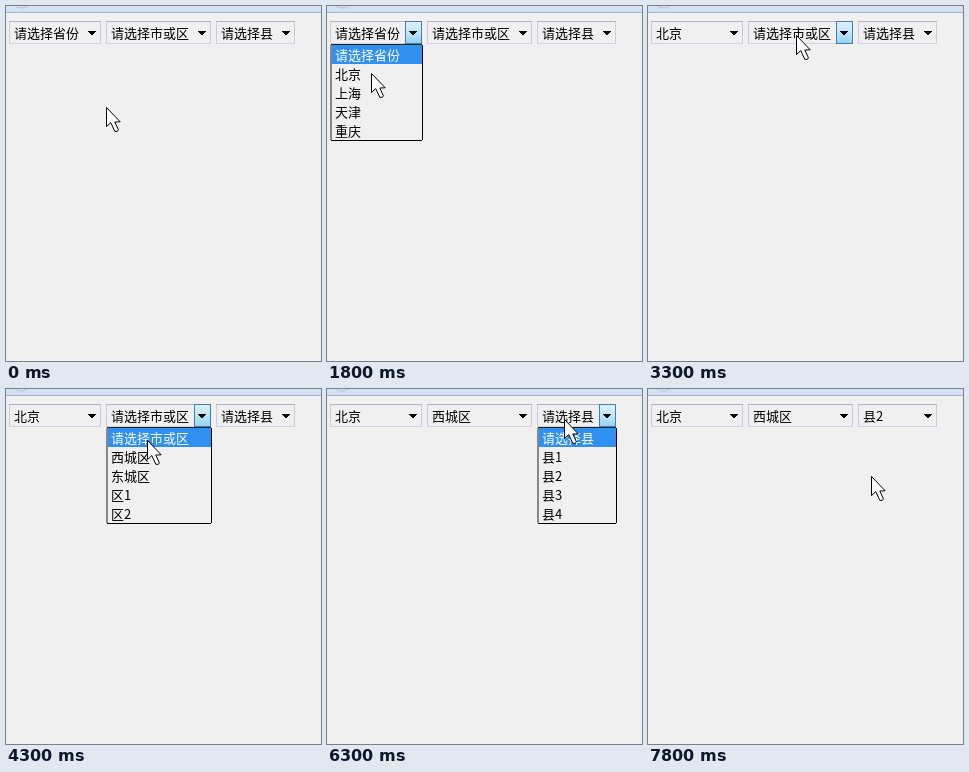
An HTML page with a canvas that plays this animation: 315 px wide and 355 px high, repeating every 8000 ms.

```html
<!DOCTYPE html>
<html lang="zh-CN">
<head>
<meta charset="utf-8">
<title>三级联动菜单</title>
<style>
html, body { margin: 0; width: 100%; height: 100%; overflow: hidden; background: #f0f0f0; }
canvas { display: block; }
</style>
</head>
<body>
<canvas id="stage" width="315" height="355"></canvas>
<script>
const ctx = document.getElementById('stage').getContext('2d');
const LOOP = 8000, ROW = 19, TOP = 15, HEIGHT = 23;
const FONT = '13px "Noto Sans CJK SC", "Noto Sans CJK", "Noto Sans CJK JP", sans-serif';

const menus = [
  { x: 3, w: 92, items: ['请选择省份', '北京', '上海', '天津', '重庆'] },
  { x: 100, w: 105, items: ['请选择市或区', '西城区', '东城区', '区1', '区2'] },
  { x: 210, w: 79, items: ['请选择县', '县1', '县2', '县3', '县4'] }
];

// at: start time, pos: pointer tip, hot: active menu, row: lit row of an open list, picked: chosen items
const steps = [
  { at: 0, pos: [100, 101], picked: [0, 0, 0] },
  { at: 300, pos: [69, 34], hot: 0, picked: [0, 0, 0] },
  { at: 800, pos: [67, 28], hot: 0, picked: [0, 0, 0] },
  { at: 1300, pos: [67, 28], hot: 0, row: 0, picked: [0, 0, 0] },
  { at: 1800, pos: [44, 67], hot: 0, row: 0, picked: [0, 0, 0] },
  { at: 2300, pos: [43, 70], hot: 0, row: 1, picked: [0, 0, 0] },
  { at: 2800, pos: [87, 60], picked: [1, 0, 0] },
  { at: 3300, pos: [148, 29], hot: 1, picked: [1, 0, 0] },
  { at: 3800, pos: [148, 29], hot: 1, row: 0, picked: [1, 0, 0] },
  { at: 4300, pos: [141, 51], hot: 1, row: 0, picked: [1, 0, 0] },
  { at: 4800, pos: [144, 71], hot: 1, row: 1, picked: [1, 0, 0] },
  { at: 5300, pos: [144, 71], picked: [1, 1, 0] },
  { at: 5800, pos: [226, 41], picked: [1, 1, 0] },
  { at: 6300, pos: [237, 30], hot: 2, row: 0, picked: [1, 1, 0] },
  { at: 6800, pos: [230, 50], hot: 2, row: 0, picked: [1, 1, 0] },
  { at: 7300, pos: [223, 86], hot: 2, row: 2, picked: [1, 1, 0] },
  { at: 7800, pos: [223, 87], picked: [1, 1, 2] }
];

function rect(x, y, w, h, color) {
  ctx.fillStyle = color;
  ctx.fillRect(x, y, w, h);
}

function frame(x, y, w, h, top, side = top, bottom = top) {
  rect(x, y, 1, h, side);
  rect(x + w - 1, y, 1, h, side);
  rect(x, y + h - 1, w, 1, bottom);
  rect(x, y, w, 1, top);
}

function label(text, x, baseline, color = '#000') {
  ctx.fillStyle = color;
  ctx.fillText(text, x, baseline);
}

function fade(y0, y1, ...colors) {
  const g = ctx.createLinearGradient(0, y0, 0, y1);
  colors.forEach((c, i) => g.addColorStop(i / (colors.length - 1), c));
  return g;
}

function drawToolbar() {
  rect(0, 0, 315, 6, fade(0, 6, '#d6e3f3', '#d0dff0'));
  rect(0, 6, 315, 1, '#a5b6d2');
  ctx.strokeStyle = '#b3c1d1';
  ctx.lineWidth = 1;
  ctx.beginPath();
  ctx.arc(15.5, -8, 10, 0.2, Math.PI - 0.2);
  ctx.stroke();
}

function drawSelect({ x, w, items }, picked, hot) {
  const right = x + w;
  frame(x, TOP, w, HEIGHT, '#b4b0ca', '#cecae0', '#d2d0e4');
  label(items[picked], x + 5, 32);
  if (hot) {
    rect(right - 17, TOP, 17, HEIGHT, fade(TOP, TOP + HEIGHT, '#dff1fc', '#c0e5f9', '#94cfef'));
    frame(right - 17, TOP, 17, HEIGHT, '#4080b0');
  }
  for (let i = 0; i < 4; i++) rect(right - 13 + i, 25 + i, 8 - 2 * i, 1, '#000');
}

function drawList({ x, w, items }, lit) {
  const y = TOP + HEIGHT, h = items.length * ROW + 2;
  rect(x + 1, y + 1, w - 1, h - 2, '#f0f0f0');
  rect(x, y + 1, 2, h - 2, '#888');
  rect(x + 1, y, w - 1, 1, '#222');
  rect(x + 1, y + h - 1, w - 1, 1, '#000');
  rect(x + w, y + 1, 1, h - 2, '#000');
  items.forEach((text, i) => {
    const rowY = y + 1 + i * ROW;
    if (i === lit) rect(x + 2, rowY, w - 2, ROW, '#3090f0');
    label(text, x + 5, rowY + 15, i === lit ? '#fff' : '#000');
  });
}

function drawPointer([x, y]) {
  const outline = [[0.5, 0.5], [0.5, 19.5], [4.8, 15.6], [8.8, 24.3], [11.4, 24.3], [12.4, 22.8], [8.8, 15], [14.2, 14.8]];
  ctx.save();
  ctx.translate(x, y);
  ctx.beginPath();
  outline.forEach(([px, py]) => ctx.lineTo(px, py));
  ctx.closePath();
  ctx.fillStyle = '#fff';
  ctx.fill();
  ctx.strokeStyle = '#000';
  ctx.lineWidth = 1;
  ctx.lineJoin = 'round';
  ctx.stroke();
  ctx.restore();
}

function draw(time) {
  const t = time % LOOP;
  const step = steps.filter(s => s.at <= t).pop();
  rect(0, 0, 315, 355, '#f0f0f0');
  ctx.font = FONT;
  drawToolbar();
  menus.forEach((menu, i) => drawSelect(menu, step.picked[i], step.hot === i));
  if (step.row !== undefined) drawList(menus[step.hot], step.row);
  drawPointer(step.pos);
}

const start = performance.now();
function tick() {
  draw(performance.now() - start);
  requestAnimationFrame(tick);
}
tick();
</script>
</body>
</html>
```
